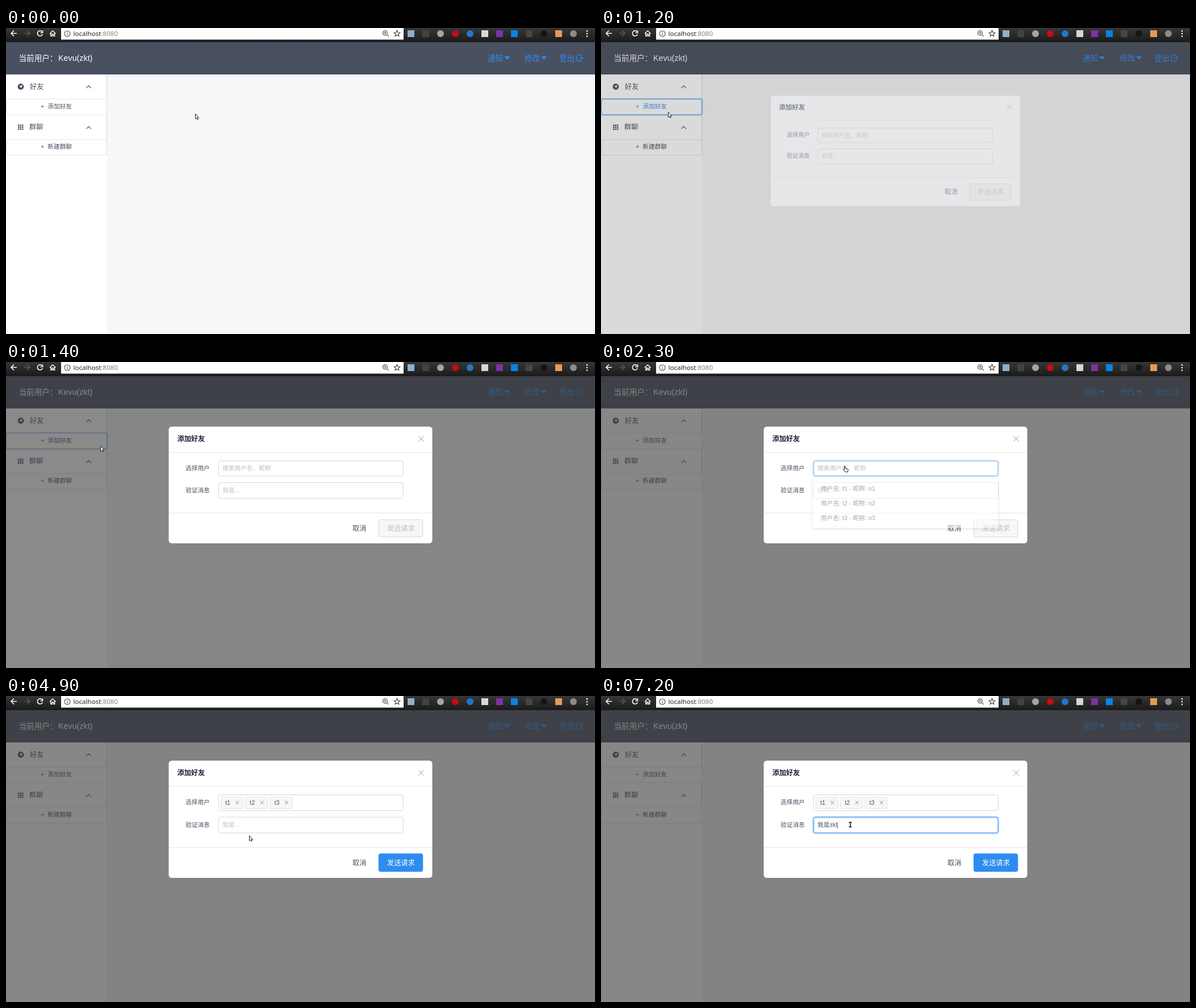
Animation of 1037x540 px, one loop 8 s. Source, as an HTML page:

```html
<!DOCTYPE html>
<html lang="zh">
<head>
<meta charset="utf-8">
<style>
html, body { margin: 0; width: 100%; height: 100%; overflow: hidden; }
svg { display: block; width: 1037px; height: 540px; }
text { font-family: "Liberation Sans", "Noto Sans CJK TC", "Noto Sans CJK SC", sans-serif; font-weight: 300; white-space: pre; }
.url { font-family: "Noto Sans", "Open Sans", sans-serif; font-weight: 400; }
.bold { font-weight: 700; }
</style>
</head>
<body>
<svg id="stage" viewBox="0 0 1037 540">
  <defs>
    <linearGradient id="bar" x2="0" y2="1">
      <stop stop-color="#373737"/><stop offset="1" stop-color="#1a1a1a"/>
    </linearGradient>
    <filter id="shadow" x="-10%" y="-20%" width="120%" height="150%">
      <feDropShadow dx="0" dy="1" stdDeviation="2.5" flood-opacity=".25"/>
    </filter>
  </defs>
  <g id="page"></g>
  <g id="toolbar"></g>
  <g id="overlay"></g>
</svg>
<script>
const LOOP = 8000, STEP = 100;
const BLUE = '#2d8cf0', INK = '#495060', PALE = '#bbbec4', LINE = '#d5d6da';
const SMALL = 10.7, MEDIUM = 12.2, LARGE = 13.6;
const USER = 'Kevu', NICK = 'zkt';
const layer = id => document.getElementById(id);
const clamp = v => Math.max(0, Math.min(1, v));

// Text is placed by its left edge and vertical middle.
const text = (x, y, size, str, fill = INK, extra = '') =>
  `<text x="${x}" y="${y + size * .37}" font-size="${size}" fill="${fill}" ${extra}>${str}</text>`;
const rect = (x, y, w, h, fill, extra = '') =>
  `<rect x="${x}" y="${y}" width="${w}" height="${h}" fill="${fill}" ${extra}/>`;
const circle = (x, y, r, fill, extra = '') =>
  `<circle cx="${x}" cy="${y}" r="${r}" fill="${fill}" ${extra}/>`;
const line = (d, stroke, width = 1, extra = '') =>
  `<path d="${d}" fill="none" stroke="${stroke}" stroke-width="${width}" ${extra}/>`;
const shape = (d, fill, extra = '') => `<path d="${d}" fill="${fill}" ${extra}/>`;
const group = (body, extra) => `<g ${extra}>${body}</g>`;
const cross = (x, y, r, color) =>
  line(`M${x - r} ${y - r}l${2 * r} ${2 * r}m0 ${-2 * r}l${-2 * r} ${2 * r}`, color);

function toolbar() {
  const star = Array.from({ length: 10 }, (_, i) => {
    const r = i % 2 ? 2.5 : 5.6, a = i * Math.PI / 5;
    return `${688.5 + r * Math.sin(a)},${10 - r * Math.cos(a)}`;
  });
  const extensions = [
    ['s', '#8db0cb'], ['s', '#424242'], ['c', '#a5a5a5'], ['c', '#c80c10'],
    ['c', '#2277cc'], ['s', '#d8d8d2'], ['s', '#7c32a4'], ['s', '#0a82e6'],
    ['s', '#454545'], ['c', '#151515'], ['s', '#e39a55'], ['c', '#8b8b8b']];
  return rect(0, 0, 1037, 25, 'url(#bar)') + rect(97, 0, 603, 20.5, '#fff') +
    line('M19 9.5H9M14 4.5l-5 5 5 5', '#fff', 1.6) +
    line('M32 9.5h10M37 4.5l5 5-5 5', '#5a5a5a', 1.6) +
    line('M63.5 6.5a4.6 4.6 0 1 0 .8 4.5M64.5 4.5v4h-4', '#fff', 1.6) +
    line('M77 10l5.2-5 5.2 5M78.8 9v5.3h2.2v-3.5h2.4v3.5h2.2V9', '#fff', 1.4) +
    circle(108, 10, 5, 'none', 'stroke="#555" stroke-width="1.2"') +
    line('M108 9.2v3.5M108 7v1.2', '#555', 1.2) +
    text(118.5, 9.7, 11.6, 'localhost<tspan fill="#808080">:8080</tspan>', '#222', 'class="url"') +
    circle(667.5, 8.7, 3.9, 'none', 'stroke="#555" stroke-width="1.3"') +
    line('M670.4 11.6l3.5 3.5M665.6 8.7h3.8M667.5 6.8v3.8', '#555', 1.2) +
    `<polygon points="${star.join(' ')}" fill="none" stroke="#444" stroke-width="1.2"/>` +
    extensions.map(([kind, color], i) => {
      const x = 713 + 26 * i;
      return kind === 'c' ? circle(x, 10, 6, color) : rect(x - 6, 4, 12, 12, color);
    }).join('') +
    [5.2, 10, 14.8].map(y => circle(1023, y, 1.3, '#fff')).join('');
}

function dashedButton(y, label, color, border) {
  return rect(.5, y + .5, 177, 27.5, '#fff', `rx="3" stroke="${border}" stroke-dasharray="2 1"`) +
    text(61, y + 13, SMALL, '+', color) + text(73.3, y + 13, SMALL, label, color);
}

function page(t) {
  const hover = t >= 800 && t < 1300;
  const glow = t >= 1100 && t < 1800 ? .35 : 0;
  const chevron = y => line(`M141.3 ${y + 2.2}l4.3-4.3 4.3 4.3`, INK, 1.1);
  let grid = '';
  for (let i = 0; i < 9; i++)
    grid += rect(21 + i % 3 * 3.5, 170.5 + Math.floor(i / 3) * 3.4, 2.5, 2.4, INK);
  return rect(0, 25, 1037, 515, '#f5f7f9') + rect(0, 82, 178, 458, '#fff') +
    rect(0, 25, 1037, 57, INK) + rect(177, 82, 1, 143, LINE) +
    text(22.5, 53, LARGE, '当前用户：', '#fff') +
    text(92, 53, 14.3, `${USER}(${NICK})`, '#fff') +
    [[848, '通知'], [913, '修改']].map(([x, s]) =>
      text(x, 53, LARGE, s, BLUE) + shape(`M${x + 29} 50h10.5l-5.25 6z`, BLUE)).join('') +
    text(974, 53, LARGE, '登出', BLUE) +
    line('M1014 49.5a5.7 5.7 0 1 0 0 7.2M1008 53h7.5m-2.6-2.6l2.6 2.6-2.6 2.6', BLUE, 1.2) +
    circle(26, 103.5, 5.4, INK) + shape('M29 100.5l-2.5 6.2-.9-2.8-2.8-.9z', '#fff') +
    text(42, 103.5, MEDIUM, '好友') + chevron(104) +
    dashedButton(125, '添加好友', hover ? BLUE : INK, hover ? BLUE : LINE) +
    rect(0, 125, 178, 28.5, 'none', `rx="3" stroke="${BLUE}" stroke-width="2.5" opacity="${glow}"`) +
    grid + text(41, 174.5, MEDIUM, '群聊') + chevron(176) +
    dashedButton(196.5, '新建群聊', INK, LINE);
}

function input(y, h, focus) {
  const box = (color, extra) => rect(374, y, 325.3, h, 'none', `rx="3.5" stroke="${color}" ${extra}`);
  return box(LINE, '') +
    box(BLUE, `stroke-width="4" opacity="${.25 * focus}"`) + box('#57a3f3', `opacity="${focus}"`);
}

function tag(i) {
  const x = 378 + 43.3 * i;
  return rect(x + .5, 178.5, 38.5, 20, '#f7f7f7', 'rx="2.5" stroke="#e1e2e5"') +
    text(x + 8, 188, SMALL, `t${i + 1}`) + cross(x + 29.3, 188, 3.1, '#888');
}

function dropdown(chosen, hovered, shift, opacity) {
  let rows = '';
  for (let i = 0; i < 3; i++) {
    const y = 212 + 26 * i, on = i < chosen;
    if (on || i === hovered) rows += rect(372.5, y, 326.5, 26, '#f3f3f3');
    rows += text(387, y + 12.3, SMALL, `用户名: t${i + 1} - 昵称: n${i + 1}`, on ? BLUE : INK);
    if (on) rows += line(`M676 ${y + 12}l3 3 5.5-6`, BLUE, 1.3);
  }
  return group(rect(372.5, 207, 326.5, 87, '#fff', 'rx="3.5" filter="url(#shadow)"') + rows,
    `transform="translate(0 ${shift})" opacity="${opacity}"`);
}

function candidates(t) {
  if (t < 6000 || t >= 6600) return '';
  const [width, keys, list] = t < 6300
    ? [136, 'wo', '1.我 2.窝 3.握'] : [198, 'wo shi', '1.我是 2.我 3.窝 4.握'];
  return rect(397, 240.5, width, 39, '#fafafa', 'rx="2" stroke="#c8c8c8"') +
    text(404, 250, SMALL, keys) + text(404, 268, SMALL, list);
}

function message(t) {
  if (t < 6000) return text(381, t < 3300 ? 226 : 227, SMALL, '我是...', PALE);
  const typed = t < 6300 ? 'wo' : t < 6600 ? 'wo shi'
    : '我是' + NICK.slice(0, t < 6900 ? 0 : t < 7200 ? 1 : 3);
  return text(381, 227.5, SMALL, typed);
}

function modal(t) {
  const chosen = t < 3300 ? 0 : t < 3900 ? 2 : 3;
  const grow = chosen ? 1 : 0;
  const open = t < 2300 ? 0 : t < 2400 ? .5 : t < 4500 ? 1 : t < 4900 ? .5 : 0;
  const focus = t >= 5700 ? 1 : 0;
  const caretOn = t >= 2400 && t < 4500 && t !== 3600 && !(t > 3600 && t < 3900) && !(t >= 4200);
  const caretX = chosen ? 385 + 43.4 * chosen : 381;
  const caretEnd = { 5700: 381, 6600: 402.5, 6900: 408, 7200: 416.5 }[Math.floor(t / 300) * 300];
  let body = rect(286.5, 114, 464, 206 + grow, '#fff', 'rx="5.5"') +
    text(301.5, 135, MEDIUM, '添加好友', '#1c2438', 'class="bold"') + cross(731, 135.5, 5, '#999') +
    rect(286.5, 159, 464, 1, '#e4e5e8') + rect(286.5, 266 + grow, 464, 1, '#e4e5e8') +
    text(316, 187, SMALL, '选择用户') + text(316, 226 + grow, SMALL, '验证消息') +
    input(174.5, 26.7 + grow, open) + input(212.8 + grow, 28, focus) + message(t);
  if (!chosen) body += text(381, 187.5, SMALL, '搜索用户名、昵称', PALE);
  for (let i = 0; i < chosen; i++) body += tag(i);
  if (caretOn) body += rect(caretX + .3, 182, 1.2, 12, '#333');
  if (caretEnd) body += rect(caretEnd - .5, 222, 1, 12, '#777');
  body += text(610, 293 + grow, MEDIUM, '取消') +
    rect(656.3, 278.3, 77.5, 30.5 + grow, chosen ? BLUE : '#f7f7f7',
      `rx="3.5" stroke="${chosen ? BLUE : LINE}"`) +
    text(671, 293 + grow, MEDIUM, '发送请求', chosen ? '#fff' : PALE);
  if (open) body += dropdown(chosen, t >= 3600 ? 2 : -1, grow - 1, open);
  return body + candidates(t);
}

// Pointer path: time, x, y, kind; linear between close keys, otherwise held.
const path = [
  [0, 333, 151], [300, 333, 151], [400, 315, 159], [500, 268, 166], [600, 212, 166],
  [700, 160, 160], [800, 130, 152], [900, 118, 148], [1300, 118, 148], [1400, 166, 148],
  [1900, 190, 142], [2000, 250, 135], [2100, 340, 158], [2200, 430, 184, 'hand'],
  [2400, 430, 190, 'hand'], [3300, 431, 251, 'hand'], [3600, 431, 271, 'hand'],
  [4500, 428, 246], [5700, 439, 227, 'beam']];

function pointer(t) {
  let i = path.length - 1;
  while (path[i][0] > t) i--;
  const [t0, x0, y0, kind] = path[i], [t1, x1, y1] = path[i + 1] || path[i];
  const p = t < 2200 && t1 > t0 ? (t - t0) / (t1 - t0) : 0;
  const x = x0 + (x1 - x0) * p, y = y0 + (y1 - y0) * p;
  const edge = 'stroke="#222" stroke-width="1" stroke-linejoin="round"';
  const body = kind === 'beam'
    ? line('M-2.5-4h5M0-4v8M-2.5 4h5', '#fff', 3) + line('M-2.5-4h5M0-4v8M-2.5 4h5', '#111', 1.5)
    : kind === 'hand'
      ? shape('M-1.5 6V1q0-1 .8-1T.2 1v3l4 .8q1 .3.8 1.5L4.3 10H0L-3 6.5q0-1.4 1.5-.5z', '#fff', edge)
      : shape('M.5.5v9l2-1.8 1.4 2.8 1.4-.7L4 7.1h2.6z', '#fff', edge);
  return group(body, `transform="translate(${x} ${y})"`);
}

function overlay(t) {
  const dim = clamp((t - 1107) / 300);
  let out = rect(0, 25, 1037, 515, '#373737', `opacity="${.6 * dim}"`);
  if (t >= 1200) {
    const entering = t < 1300;
    out += group(modal(t), entering
      ? 'opacity=".45" transform="translate(518.5 217) scale(.946) translate(-518.5 -217)"' : '');
  }
  return out + pointer(t);
}

let shown = -1;
function draw(now) {
  const t = Math.floor(now % LOOP / STEP) * STEP;
  if (t !== shown) {
    shown = t;
    layer('page').innerHTML = page(t);
    layer('overlay').innerHTML = overlay(t);
  }
  requestAnimationFrame(() => draw(performance.now() - start));
}

layer('toolbar').innerHTML = toolbar();
const start = performance.now();
draw(0);
</script>
</body>
</html>
```
